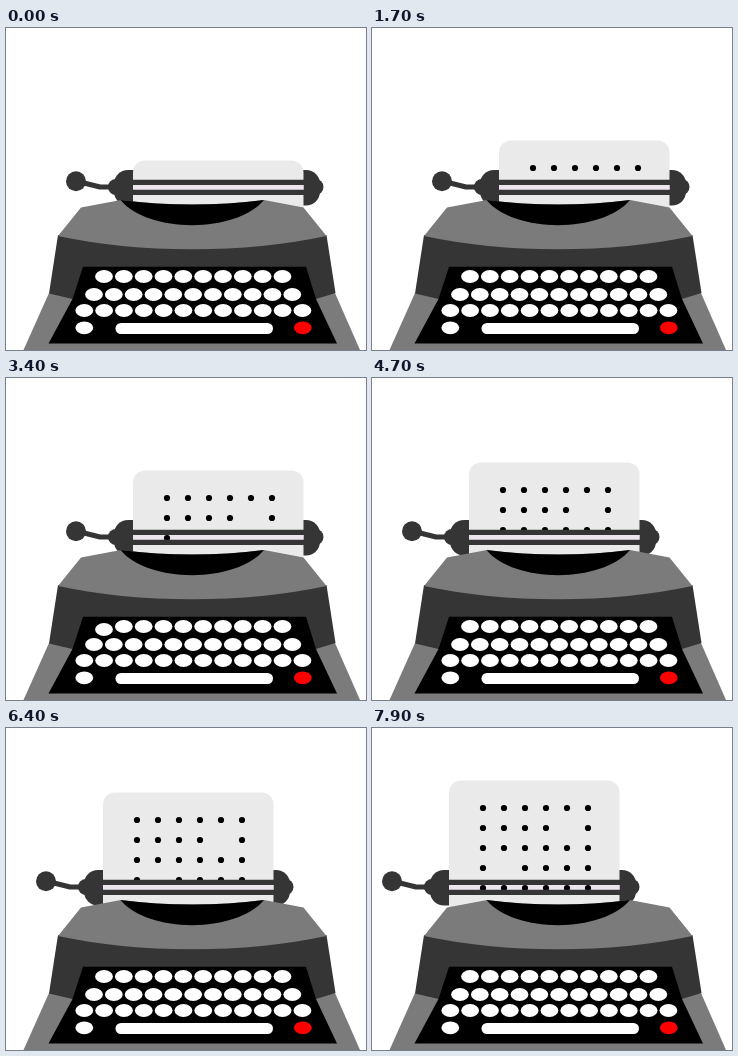
Write an HTML page with a canvas that moves like this. It is 360x322 px and loops after 8000 ms.

```html
<!DOCTYPE html>
<html lang="en">
<head>
<meta charset="utf-8">
<title>Typewriter</title>
<style>
  html, body { margin: 0; width: 100%; height: 100%; overflow: hidden; background: #fff; }
  canvas { display: block; width: 360px; height: 322px; }
</style>
</head>
<body>
<canvas id="stage" width="360" height="322"></canvas>
<script>
const ctx = document.getElementById('stage').getContext('2d');

const LOOP = 8000, TICK = 100;
const COLS = 6, STEP = 10, LINE = 20;
const GREY = '#7b7b7b', DARK = '#353535', PAPER = '#eaeaea', BLACK = '#000', WHITE = '#fff';

// Every character strikes its key; a space leaves no dot. '^' is the lone left key.
const text = ['^storm', 'like a', 'quartz', 'a fog.', 'silent'];
const keyRows = [
  { chars: 'qwertyuiop', x: 98, y: 248.5 },
  { chars: "asdfghjkl;'", x: 88, y: 266.5 },
  { chars: 'zxcvbnm,:-!.', x: 78.3, y: 282.5 }
];
const KEY_GAP = 19.83, LOW_Y = 299.8;

// Tick of a line's first stroke; the carriage return takes the five ticks before it.
const lineStart = row => Math.floor(1.3 + 16.75 * row);
const RETURN = 5;

function stateAt(tick) {
  let row = 0;
  while (tick >= lineStart(row + 1)) row++;
  const k = tick - lineStart(row);
  if (k < 0) return { row, typed: 0, shift: 0, lift: 0, key: '' };

  const back = Math.max(0, tick - lineStart(row + 1) + RETURN + 1);
  const col = Math.min(COLS - 1, Math.ceil(k / 2));
  const striking = !back && k % 2 === 0 && k / 2 < COLS;
  return {
    row,
    typed: Math.min(COLS, Math.floor(k / 2) + 1),
    shift: -STEP * (back ? RETURN - back : col),
    lift: LINE * (row + back / RETURN),
    key: striking ? text[row][col] : ''
  };
}

function poly(color, ...pts) {
  ctx.fillStyle = color;
  ctx.beginPath();
  for (let i = 0; i < pts.length; i += 2) ctx.lineTo(pts[i], pts[i + 1]);
  ctx.fill();
}

function oval(color, x, y, rx, ry = rx) {
  ctx.fillStyle = color;
  ctx.beginPath();
  ctx.ellipse(x, y, rx, ry, 0, 0, Math.PI * 2);
  ctx.fill();
}

function box(color, x, y, w, h, r = 0) {
  ctx.fillStyle = color;
  ctx.beginPath();
  ctx.roundRect(x, y, w, h, r);
  ctx.fill();
}

function drawCarriage(s) {
  ctx.save();
  ctx.translate(s.shift, 0);

  // Handle and knobs
  ctx.strokeStyle = DARK;
  ctx.lineWidth = 5;
  ctx.lineJoin = 'round';
  ctx.beginPath();
  ctx.moveTo(70, 153);
  ctx.lineTo(94, 159);
  ctx.lineTo(110, 159);
  ctx.stroke();
  oval(DARK, 70, 153.3, 10);
  oval(DARK, 110, 159, 8);
  oval(DARK, 309.5, 159, 8);
  box(DARK, 108, 142, 20, 35.5, [14, 0, 0, 14]);
  box(DARK, 296, 142, 18, 35.5, [0, 14, 14, 0]);

  // Paper, dots and the two rails
  box(PAPER, 127, 132.5 - s.lift, 170.5, 52 + s.lift, [12, 12, 0, 0]);
  box('#ece5ee', 127, 156, 170.5, 7);
  for (let r = 0; r <= s.row; r++) {
    const count = r < s.row ? COLS : s.typed;
    for (let c = 0; c < count; c++) {
      if (text[r][c] !== ' ') oval(BLACK, 161 + 21 * c, 160 + LINE * r - s.lift, 3.1);
    }
  }
  box(DARK, 126, 151.7, 172, 5.3);
  box(DARK, 126, 161.7, 172, 5.3);
  ctx.restore();
}

function drawBody() {
  poly(GREY, 43, 265, 329, 265, 354, 322, 17.5, 322);
  poly(DARK, 52, 207, 320.5, 207, 329.5, 265, 310, 271, 66.5, 271, 43, 265.5);

  ctx.fillStyle = GREY;
  ctx.beginPath();
  ctx.moveTo(52, 208);
  ctx.lineTo(75, 179.5);
  ctx.lineTo(115, 172);
  ctx.quadraticCurveTo(186, 181, 258, 172);
  ctx.lineTo(297.5, 179.5);
  ctx.lineTo(320.5, 208);
  ctx.bezierCurveTo(240, 225.7, 132, 225.7, 52, 208);
  ctx.fill();

  ctx.fillStyle = BLACK;
  ctx.beginPath();
  ctx.moveTo(114.5, 172);
  ctx.quadraticCurveTo(186, 181, 258, 172);
  ctx.bezierCurveTo(230, 205.5, 142, 205.5, 114.5, 172);
  ctx.fill();
}

function drawKeys(struck) {
  const key = (char, x, y, color = WHITE) =>
    oval(color, x, y + (char === struck ? 3 : 0), 8.9, 6.4);

  poly(BLACK, 77, 238.8, 300, 238.8, 310, 271, 331, 315.5, 42.5, 315.5, 66.5, 271);
  for (const row of keyRows) {
    [...row.chars].forEach((char, i) => key(char, row.x + KEY_GAP * i, row.y));
  }
  key('^', 78.3, LOW_Y);
  key('red', 296.8, LOW_Y, '#f00');
  box(WHITE, 109.5, 295 + (struck === ' ' ? 3 : 0), 157.5, 11, 5.5);
}

function draw(time) {
  const s = stateAt(Math.floor((time % LOOP) / TICK));
  ctx.fillStyle = WHITE;
  ctx.fillRect(0, 0, 360, 322);
  drawCarriage(s);
  drawBody();
  drawKeys(s.key);
}

const begin = performance.now();
function loop() {
  draw(performance.now() - begin);
  requestAnimationFrame(loop);
}
loop();
</script>
</body>
</html>
```
